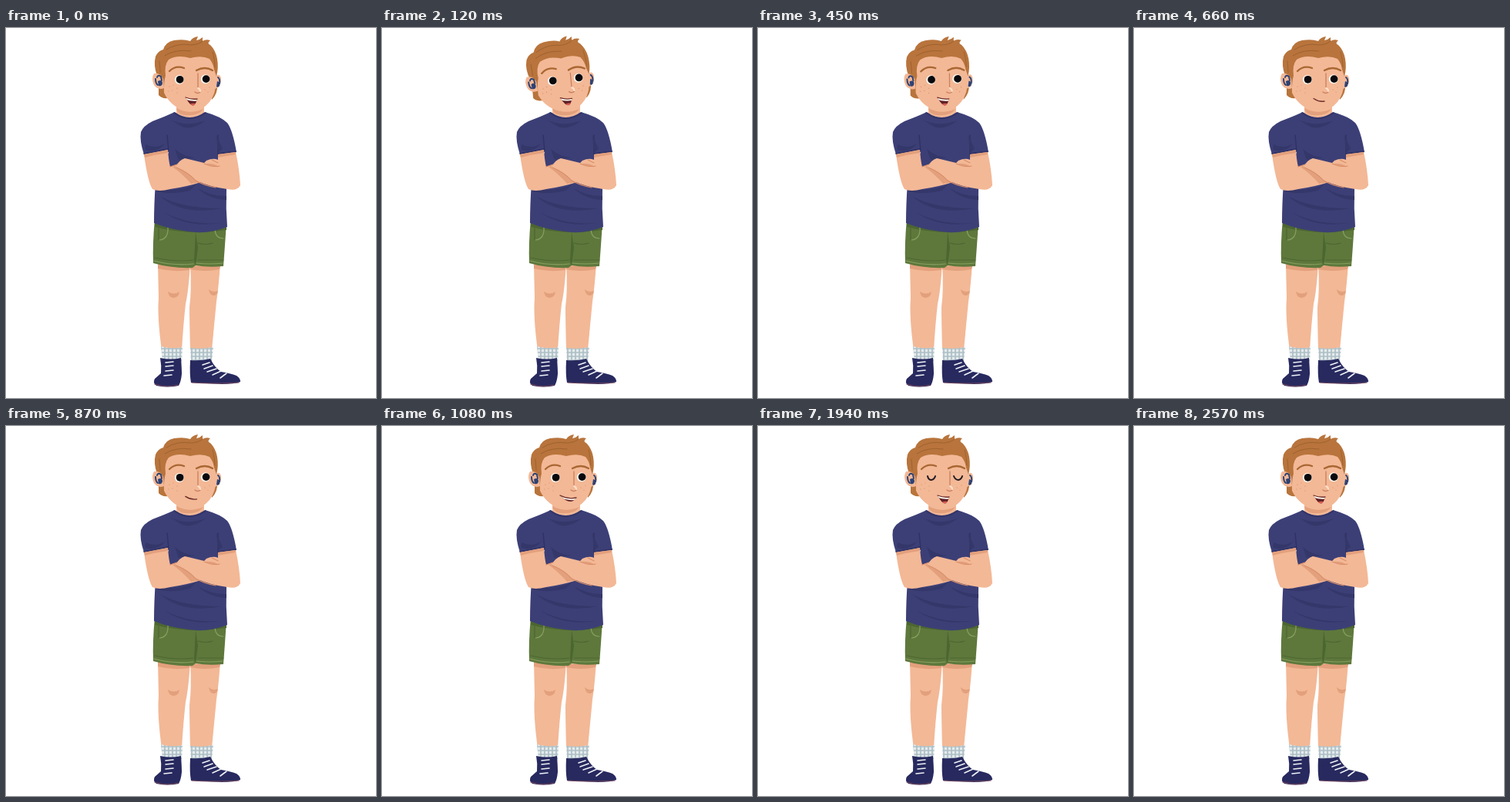
An HTML page for the animation above (3340 ms loop, 480x480 px).

```html
<!DOCTYPE html>
<html>
<head>
<meta charset="utf-8">
<style>
html, body { margin: 0; width: 100%; height: 100%; overflow: hidden; background: #fff; }
svg { display: block; width: 100vw; height: 100vh; }
.line { fill: none; stroke-linecap: round; stroke-linejoin: round; }
.skin { fill: #f3b896; }
.shade { fill: #e3a07c; }
.shirt { fill: #3c3f76; }
.fold { fill: #343769; }
.hair { fill: #b8743c; }
.navy { fill: #27295f; }
</style>
</head>
<body>
<svg viewBox="0 0 480 480">
  <defs>
    <pattern id="knit" width="5" height="5" patternUnits="userSpaceOnUse">
      <path fill="#e4ebed" d="M0 0h5v5H0z"/>
      <path stroke="#adbfc5" stroke-width="1.7" d="M0 1H5M1 0V5"/>
    </pattern>
    <clipPath id="mouthClip"><path id="mouthShape"/></clipPath>
  </defs>

  <!-- legs -->
  <path class="skin" d="M197 305H239Q237 340 233 358Q230 385 228 418H202Q196 375 198 350Z"/>
  <path class="skin" d="M239 305H278Q276 335 273 355Q270 385 267 418H239Q238 380 238 362Q241 340 239 305Z"/>
  <path class="shade" d="M197 307H239L238 314Q216 317 197 312ZM239 309H278L277 313Q258 317 239 313Z"/>
  <path class="shade" d="M210 342Q218 347 225 342Q224 350 217 350Q211 349 210 342ZM263 339Q268 344 275 341Q274 347 269 347Q264 346 263 339Z"/>

  <!-- socks and shoes -->
  <path fill="url(#knit)" d="M201 413Q215 417 229 414L228 433H203ZM239 415Q254 417 269 414L267 433H240Z"/>
  <path class="navy" d="M200 428Q214 431 227 428Q228 442 228 449Q227 459 224 464Q210 467 195 464Q190 460 193 455L201 448Q202 438 200 428Z"/>
  <path class="navy" d="M239 431Q254 432 265 429Q271 441 279 446Q291 448 299 451Q304 454 304 459Q297 462 280 462L240 460Q238 450 239 431Z"/>
  <path class="line" stroke="#70445a" stroke-width="1.1" d="M193 462Q208 467 223 463M241 460Q268 462 302 460"/>
  <path class="line" stroke="#eff0f5" stroke-width="1.6" d="M207 434L217 433M207 439L217 438M207 445L217 444M205 451L215 450M255 437L264 434M257 442L268 438M261 446L273 442M268 450L279 445M278 454L286 448"/>

  <!-- shorts -->
  <path fill="#5e783c" d="M193 248L286 252Q284 283 282 309Q262 311 246 308L242 311Q215 312 191 305Q190 280 193 248Z"/>
  <path fill="#4c6631" d="M193 249L286 254V262Q239 270 193 258ZM246 264L249 285L246 308L244 302Z"/>
  <path class="line" stroke="#87a060" stroke-width="1.2" d="M192 302Q218 309 243 306M247 305Q265 307 281 305M210 258Q211 274 199 275M271 262Q272 273 282 273"/>
  <path class="line" stroke="#4c6631" stroke-width="1.2" d="M198 256V275M193 298Q220 304 243 301M249 279Q259 282 268 279M249 301L282 301"/>

  <!-- neck and shirt -->
  <path class="skin" d="M221 96H257V114Q240 122 221 113Z"/>
  <path class="shade" d="M221 104Q238 113 256 105Q250 115 231 113Q222 111 221 104Z"/>
  <path class="shirt" d="M219 109Q238 123 258 109Q279 115 287 123Q294 132 299 161L275 168L286 209Q285 234 287 258Q262 268 237 264Q211 261 192 253Q192 229 194 200L211 161L179 164Q173 146 175 135Q178 127 190 121Q206 115 219 109Z"/>
  <path class="line" stroke="#2f3164" stroke-width="1.4" d="M218 110Q238 125 259 110M179 163L210 157M275 163L298 160M209 139L211 159M275 139L275 164"/>
  <path class="fold" d="M214 119Q234 129 259 120Q242 133 228 128ZM181 151Q196 158 207 149Q197 163 180 158ZM219 157Q232 168 246 168L224 171ZM273 139L281 157L275 162ZM200 218Q227 234 280 234Q228 244 200 218ZM205 239Q236 256 279 253Q235 260 205 239ZM249 208Q265 218 286 218L286 223Q263 222 249 208ZM195 208Q220 214 247 203L238 211Q213 217 195 212Z"/>

  <!-- crossed arms -->
  <path class="skin" d="M179 164L210 158Q211 172 213 180L235 172L253 200Q234 206 213 209Q198 213 190 209Q184 200 179 164Z"/>
  <path class="shade" d="M179 164L210 158L210 162Q195 164 180 168ZM216 180L223 178L244 194L252 200L240 202Q231 191 216 180Z"/>
  <path class="skin" d="M275 164L298 161Q303 184 304 204Q300 212 287 209Q264 206 247 198Q236 187 220 180Q225 171 232 169L257 175L260 172Q269 168 275 171Z"/>
  <path class="shade" d="M275 164L298 161V164Q286 166 275 168ZM259 176Q269 175 276 180Q268 181 259 176Z"/>
  <path class="line" stroke="#d98e69" stroke-width="1.1" d="M221 181Q236 187 246 198Q256 204 272 207M257 176Q269 181 277 179M267 171L275 175M213 180L222 177"/>

  <!-- head -->
  <g id="head">
    <path class="hair" d="M198 68L207 65L210 91Q202 92 198 87ZM266 70L274 74Q275 85 267 93Z"/>
    <path class="skin" d="M270 64Q277 57 279 65Q280 77 271 79Z"/>
    <path class="skin" d="M204 40Q235 22 271 39Q274 61 272 76Q270 92 259 101Q246 111 231 107Q213 101 205 84Z"/>
    <path class="hair" d="M203 80Q197 72 196 62Q191 48 194 37Q197 30 204 28Q207 18 218 16Q231 14 239 17Q242 12 249 11L247 16Q252 15 255 12L255 17Q259 14 265 16Q260 20 265 22Q272 29 274 40Q276 52 273 63L270 54Q269 46 264 40Q254 35 239 39Q222 34 211 41Q205 48 207 62Q205 68 205 78Z"/>
    <path class="line" stroke="#a0622f" stroke-width="1" d="M208 28Q223 19 239 22Q249 22 255 17M206 36Q220 27 240 30M199 43Q200 53 200 58M268 31Q271 42 271 51"/>
    <path class="skin" d="M204 66Q199 57 192 59Q188 65 192 74Q197 81 205 78Z"/>
    <path class="line" stroke="#2e4273" stroke-width="2" d="M196 64Q197 60 201 63L202 68M194 66Q194 72 197 74M275 64Q278 66 277 72"/>
    <path fill="#2e4273" d="M197 69Q202 66 203 71Q203 76 198 75ZM274 69Q278 70 277 75Q275 78 273 76Z"/>
    <path class="line" stroke="#a96732" stroke-width="2.3" d="M212 56Q220 48 231 52M247 55Q258 49 268 55"/>
    <g id="open">
      <circle cx="224.8" cy="67" r="6" fill="#fff8ef"/><circle cx="258.8" cy="66.3" r="6" fill="#fff8ef"/>
      <circle cx="225.6" cy="66.8" r="4.9" fill="#08080d"/><circle cx="259.6" cy="66.1" r="4.9" fill="#08080d"/>
    </g>
    <path id="shut" class="line" stroke="#221a21" stroke-width="2" d="M220 65Q221 70 225 70Q229 69 230 65M254 65Q256 70 260 70Q264 69 265 65"/>
    <path class="line" stroke="#c98160" stroke-width="1.3" d="M249 59L249 78M245 83Q249 86 252 83"/>
    <path class="line" stroke="#ffe0ca" stroke-width="2" d="M249 78Q252 79 252 82"/>
    <path class="line" stroke="#d18b64" stroke-width="1.2" d="M212 76h0M217 74h0M222 78h0M216 81h0M222 84h0M211 82h0M258 80h0M264 77h0M262 83h0"/>
    <g clip-path="url(#mouthClip)">
      <path fill="#5e2025" d="M228 85H255V104H228Z"/>
      <ellipse cx="243" cy="101" rx="6" ry="3.2" fill="#d95c55"/>
      <path id="teeth" class="line" stroke="#fffaf2" stroke-width="5"/>
    </g>
    <path id="lip" class="line" stroke="#70302b" stroke-width="1.3"/>
  </g>
</svg>
<script>
const $ = id => document.getElementById(id);
const LOOP = 3340;
const ease = p => (1 - Math.cos(Math.PI * Math.min(1, Math.max(0, p)))) / 2;

// Mouth: left x, left y, right x, right y, upper sag, lower sag
const talk = [233, 90, 248, 92, 2, 19];
const calm = [233, 91.5, 247, 95, 3, 3];
const grin = [231, 90, 252, 93, 4, 13];
const moods = [[0, talk], [540, talk], [640, calm], [840, calm], [990, grin], [1110, grin], [1320, talk], [LOOP, talk]];

function mouthAt(t) {
  const i = moods.findIndex(m => m[0] > t);
  const [t0, a] = moods[i - 1], [t1, b] = moods[i];
  const p = ease((t - t0) / (t1 - t0));
  return a.map((v, k) => v + (b[k] - v) * p);
}

function drawMouth([x0, y0, x1, y1, upper, lower]) {
  const x = (x0 + x1) / 2, y = (y0 + y1) / 2;
  const top = `M${x0} ${y0}Q${x} ${y + upper} ${x1} ${y1}`;
  $('mouthShape').setAttribute('d', `${top}Q${x + 3} ${y + lower} ${x0} ${y0}Z`);
  $('teeth').setAttribute('d', top);
  $('lip').setAttribute('d', top);
}

function draw(now) {
  const t = now % LOOP;
  const tilt = -6 * (t < 150 ? ease(t / 150) : 1 - ease((t - 150) / 390));
  const blink = t >= 1940 && t < 2570;
  $('head').setAttribute('transform', `rotate(${tilt} 240 108)`);
  $('open').style.display = blink ? 'none' : '';
  $('shut').style.display = blink ? '' : 'none';
  drawMouth(mouthAt(t));
}

const start = performance.now();
function tick() {
  draw(performance.now() - start);
  requestAnimationFrame(tick);
}
tick();
</script>
</body>
</html>
```
